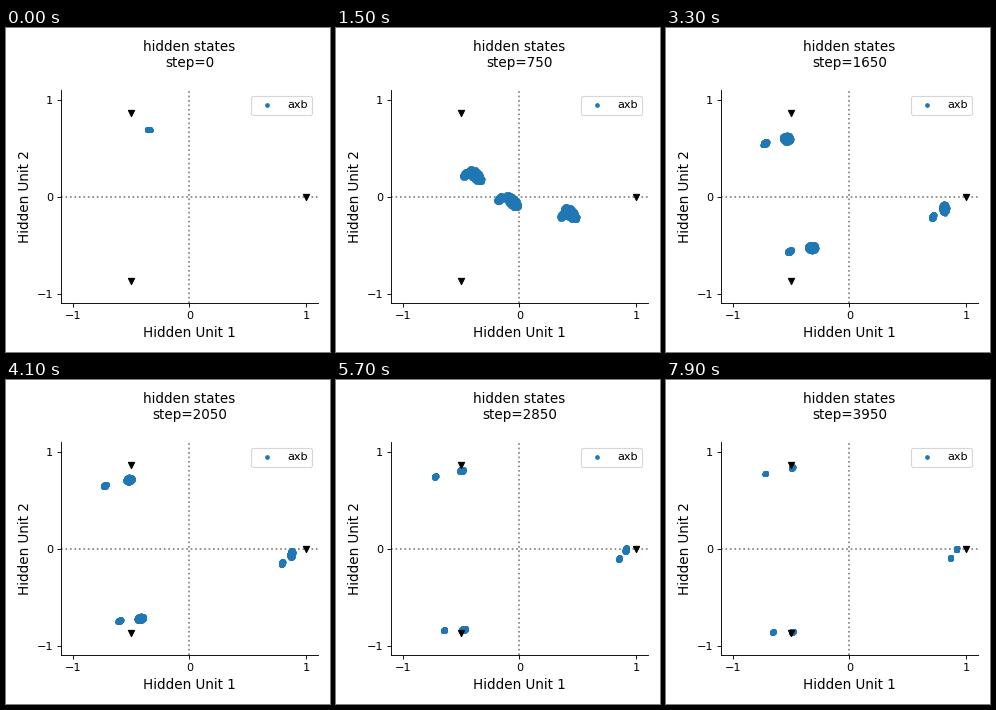
These frames come from a looping animation (324x324 px, 8 s). A matplotlib script:

```python
import numpy as np
import matplotlib.pyplot as plt
from matplotlib.animation import FuncAnimation

FRAMES, INTERVAL, STEP = 80, 100, 50

# The states shrink to the middle, split along a line, then turn to the roots.
START, SEED = np.array([-0.347, 0.694]), np.array([1.6, 0.3])
DECAY, SPLIT, FADE = 230, (1350, 4.5), 2600
REST, SMALL, BIG = 0.6, 7, 15
PX = 2.2 / np.array([257, 213])

# Per arm: sharpness of the turn, final stretch,
# then plateau, end and turn time of its small and big cluster.
ARMS = [
    (4.3, (1.15, 0.85),
     [((-.75, .36), (-.72, .79), 3400), ((-.62, .33), (-.488, .85), 3200)]),
    (5.5, (1.2, 0.7),
     [((-.26, 0), (-.657, -.862), 2950), ((-.09, -.05), (-.492, -.86), 3100)]),
    (5.5, (0.45, 1.25),
     [((.6, -.31), (.87, -.09), 3400), ((.7, -.28), (.92, 0), 3150)]),
]


def rise(t, mid, power):
    """S-curve from 0 to 1, halfway at mid."""
    return t ** power / (t ** power + mid ** power)


def disk(n):
    """Evenly filled unit disk."""
    k = np.arange(n)
    r, a = np.sqrt(k / (n - 1)), k * np.pi * (3 - np.sqrt(5))
    return np.array([r * np.cos(a), r * np.sin(a)])


def cluster(t, plateau, end, mid, power, stretch, big):
    split, turn = rise(t, *SPLIT), rise(t, mid, power)
    fade = np.exp(-t / DECAY)
    center = (START * fade + np.array(plateau) * (split - turn)
              + np.array(end) * turn)

    spread = (BIG if big else SMALL) * rise(t, 900, 3) * np.exp(-t / FADE)
    half = (REST + (SEED - REST) * fade
            + spread * (1 + (np.array(stretch) - 1) * turn))
    tilt = turn - 0.6 if big else 0.4
    u, v = disk(150 if big else 60)
    shape = np.column_stack([u, tilt * u + np.sqrt(1 - tilt ** 2) * v])
    return center + shape * half * PX


def states(t):
    return np.vstack([cluster(t, *keys, power, stretch, big)
                      for power, stretch, pair in ARMS
                      for big, keys in enumerate(pair)])


def title(frame):
    return f"hidden states\nstep={frame * STEP}\n"


fig, ax = plt.subplots(figsize=(4, 4), dpi=81)
ax.axhline(0, color="gray", ls=":", zorder=0)
ax.axvline(0, color="gray", ls=":", zorder=0)
dots = ax.scatter(*states(0).T, s=10, color="tab:blue", label="axb", zorder=1)
roots = np.exp(2j * np.pi * np.arange(3) / 3)
ax.scatter(roots.real, roots.imag, s=30, marker="v", color="black", zorder=2)

ax.set(xlim=(-1.1, 1.1), ylim=(-1.1, 1.1), xticks=[-1, 0, 1], yticks=[-1, 0, 1])
ax.set_xlabel("Hidden Unit 1", fontsize=12)
ax.set_ylabel("Hidden Unit 2", fontsize=12)
ax.spines[["top", "right"]].set_visible(False)
ax.legend(loc="upper right")
head = ax.set_title(title(0), fontsize=12)
fig.tight_layout()


def update(frame):
    dots.set_offsets(states(frame * INTERVAL))
    head.set_text(title(frame))
    return dots, head


anim = FuncAnimation(fig, update, frames=FRAMES, interval=INTERVAL,
                     repeat=True, repeat_delay=0)
plt.show()
```
